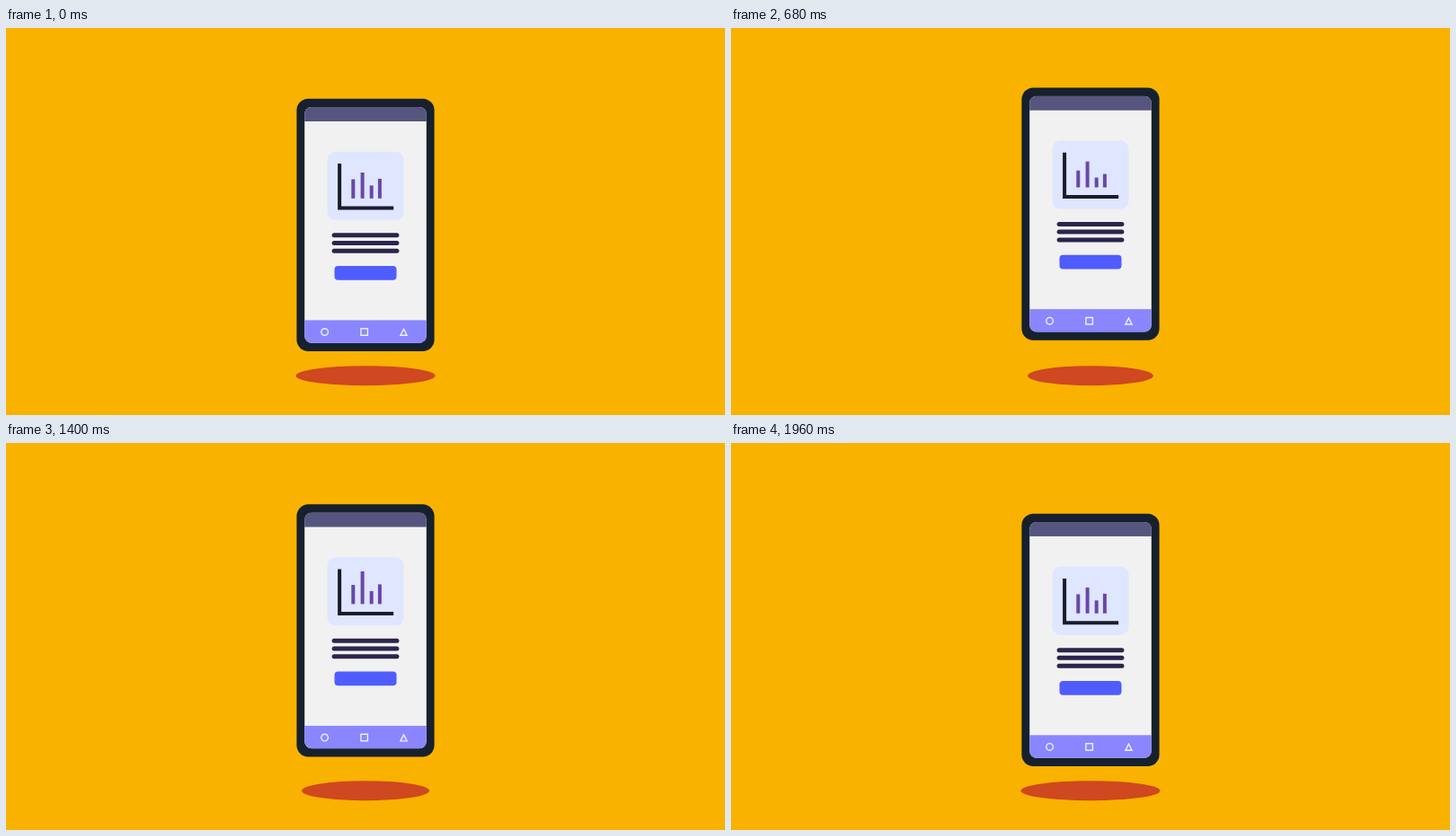
An HTML page that plays this animation: 800 px wide and 431 px high, repeating every 2 s.

```html
<!DOCTYPE html>
<html lang="en">
<head>
<meta charset="utf-8">
<title>Floating phone</title>
<style>
  html, body { margin: 0; width: 100%; height: 100%; overflow: hidden; background: #f9b200; }
  svg { display: block; width: 100%; height: 100%; }
</style>
</head>
<body>
<svg viewBox="0 0 800 431">
  <defs>
    <clipPath id="screen"><rect x="332.2" y="88" width="135.6" height="262.8" rx="8"/></clipPath>
  </defs>
  <ellipse id="shadow" cx="400" cy="387.2" rx="77.5" ry="11" fill="#cf4820"/>
  <g id="phone">
    <rect x="323.4" y="78.8" width="153.2" height="281.2" rx="13" fill="#17212d"/>
    <g clip-path="url(#screen)">
      <rect x="332" y="88" width="136" height="263" fill="#f1f1f1"/>
      <rect x="332" y="88" width="136" height="16" fill="#55557f"/>
      <rect x="332" y="325.4" width="136" height="26" fill="#8a86ff"/>
    </g>
    <rect x="357.5" y="137.8" width="85" height="76" rx="9" fill="#dfe6ff"/>
    <path d="M371.1 151V200.4H431.2" fill="none" stroke="#191c2b" stroke-width="4"/>
    <g id="bars" fill="#6b46a9"></g>
    <g fill="#2b254c">
      <rect x="362.6" y="228.3" width="74.8" height="5" rx="2.5"/>
      <rect x="362.6" y="236.9" width="74.8" height="5" rx="2.5"/>
      <rect x="362.6" y="245.8" width="74.8" height="5" rx="2.5"/>
    </g>
    <rect x="365.5" y="265" width="69" height="15.7" rx="4" fill="#4f5dff"/>
    <g fill="none" stroke="#f1f1ff" stroke-width="1.4">
      <circle cx="354.6" cy="338.5" r="3.8"/>
      <rect x="394.9" y="334.8" width="7.5" height="7.5"/>
      <path d="M442.5 335.4L446.1 342.3H438.9Z"/>
    </g>
  </g>
</svg>
<script>
const LOOP = 2000, STEP = 40, BASE = 189.8;
const $ = id => document.getElementById(id);

// Each bar rests at height h and swells by amp once between start and end.
const bars = [
  { x: 384.3, h: 21.3, amp: -12.5, start: 560, end: 1360 },
  { x: 394.6, h: 28.8, amp: 7.7, start: 840, end: 1880 },
  { x: 404.7, h: 14.4, amp: -3.6, start: 320, end: 1120 },
  { x: 413.9, h: 21.9, amp: -8.8, start: 160, end: 960 }
];

for (const bar of bars) {
  bar.el = document.createElementNS("http://www.w3.org/2000/svg", "rect");
  bar.el.setAttribute("x", bar.x);
  bar.el.setAttribute("width", 4);
  $("bars").append(bar.el);
}

// Smooth 0 -> 1 -> 0 bump across the given span
function bump(t, start, end) {
  const p = Math.min(1, Math.max(0, (t - start) / (end - start)));
  return (1 - Math.cos(2 * Math.PI * p)) / 2;
}

function draw(now) {
  const t = Math.floor(now % LOOP / STEP) * STEP;
  const lift = bump(t, 0, LOOP);
  $("phone").setAttribute("transform", `translate(0 ${-16 * lift})`);
  $("shadow").setAttribute("rx", 77.5 - 10 * lift);
  for (const { el, h, amp, start, end } of bars) {
    const height = h + amp * bump(t, start, end);
    el.setAttribute("y", BASE - height);
    el.setAttribute("height", height);
  }
}

const begin = performance.now();
function tick() {
  draw(performance.now() - begin);
  requestAnimationFrame(tick);
}
tick();
</script>
</body>
</html>
```
